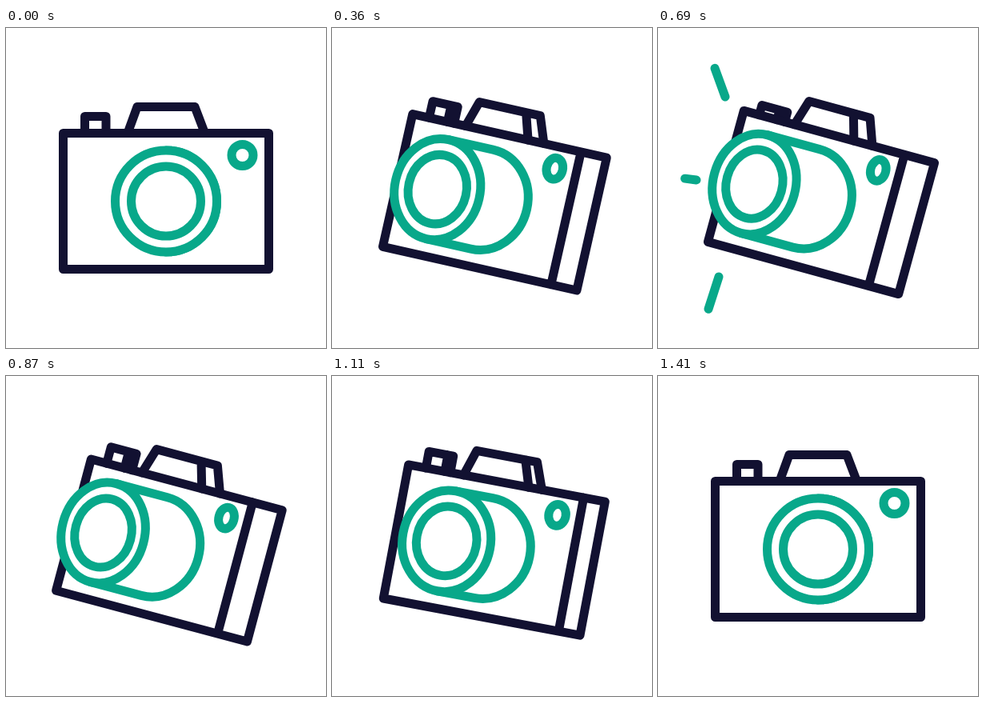
Recreate the animation shown at these times as an HTML page. Size 400 by 400 pixels, loop 1.47 s.

```html
<!DOCTYPE html>
<html lang="en">
<head>
<meta charset="utf-8">
<title>Camera</title>
<style>
  html, body { margin: 0; height: 100%; overflow: hidden; background: #fff; }
  svg { display: block; width: 100vw; height: 100vh; }
  path, ellipse { stroke-width: 11; stroke-linejoin: round; stroke-linecap: round; }
  .dark { fill: none; stroke: #121131; }
  .green { fill: #fff; stroke: #08a88a; }
</style>
</head>
<body>
<svg viewBox="0 0 400 400">
  <path id="rays" class="green"/>
  <g id="camera">
    <path id="button" class="dark"/>
    <path id="hump" class="dark"/>
    <path id="body" class="dark"/>
    <ellipse id="lamp" class="green"/>
    <path id="barrel" class="green"/>
    <ellipse id="rim" class="green"/>
    <ellipse id="glass" class="green"/>
  </g>
</svg>
<script>
const LOOP = 1470, STEP = 30;
const $ = id => document.getElementById(id);
const mix = (a, b, k) => a + (b - a) * k;
const span = (t, a, b) => Math.min(1, Math.max(0, (t - a) / (b - a)));
const ease = (t, a, b) => { const u = span(t, a, b); return u * u * (3 - 2 * u); };
const path = (id, d) => $(id).setAttribute('d', d);

function ellipse(id, cx, cy, rx, ry) {
  const attrs = { cx, cy, rx, ry };
  for (const k in attrs) $(id).setAttribute(k, attrs[k]);
}

// Each ray runs outwards: x1, y1, x2, y2
const RAYS = [[84, 86, 70, 47.5], [48, 190, 32.5, 188], [76, 311, 62, 354.5]];

function drawRays(t) {
  const head = ease(t, 615, 705), tail = ease(t, 705, 825);
  const show = head > 0 && tail < 1;
  path('rays', show ? RAYS.map(([x1, y1, x2, y2]) =>
    `M${mix(x1, x2, tail)} ${mix(y1, y2, tail)}L${mix(x1, x2, head)} ${mix(y1, y2, head)}`
  ).join('') : '');
}

function draw(t) {
  const back = 1 - ease(t, 945, 1410);
  const settle = ease(t, 630, 840);
  const tilt = ease(t, 30, 480) * mix(1, 0.97, settle) * back;
  const turn = ease(t, 0, 480) * mix(1, 0.98, settle) * back;
  const press = 10 * (ease(t, 540, 630) - ease(t, 660, 780));
  const at = (a, b) => mix(a, b, turn);

  $('camera').setAttribute('transform',
    `translate(${at(200, 204)} ${at(216.5, 218)}) rotate(${15.4 * tilt})`);

  const w = at(128.5, 123.5), side = at(128.5, 84.5);
  path('body', `M${-w} -85H${w}V85H${-w}ZM${side} -85V85`);

  path('hump', `M${at(-48, -58)} -85L${at(-36, -48)} -118H${at(36, 31)}L${at(48.5, 43)} -85` +
    `M${at(36, 9.5)} -118L${at(48.5, 19)} -85`);

  const top = -106 + press;
  path('button', `M${at(-101.5, -103.5)} -85V${top}H${at(-75, -70.5)}V-85M${at(-75, -80.5)} ${top}V-85`);

  ellipse('lamp', at(95.5, 58), -57.5, at(13.5, 9.5), 13.5);

  const front = at(0, -87), base = at(0, -19.5), r = at(63.5, 56.5);
  path('barrel', `M${front} -63.5H${base}A${r} 63.5 0 0 1 ${base} 63.5H${front}`);
  ellipse('rim', front, 0, at(63.5, 51.6), 63.5);
  ellipse('glass', front, 0, at(43.5, 35), 43.5);

  drawRays(t);
}

function tick() {
  const t = performance.now() % LOOP;
  draw(Math.floor(t / STEP) * STEP);
  requestAnimationFrame(tick);
}
tick();
</script>
</body>
</html>
```
